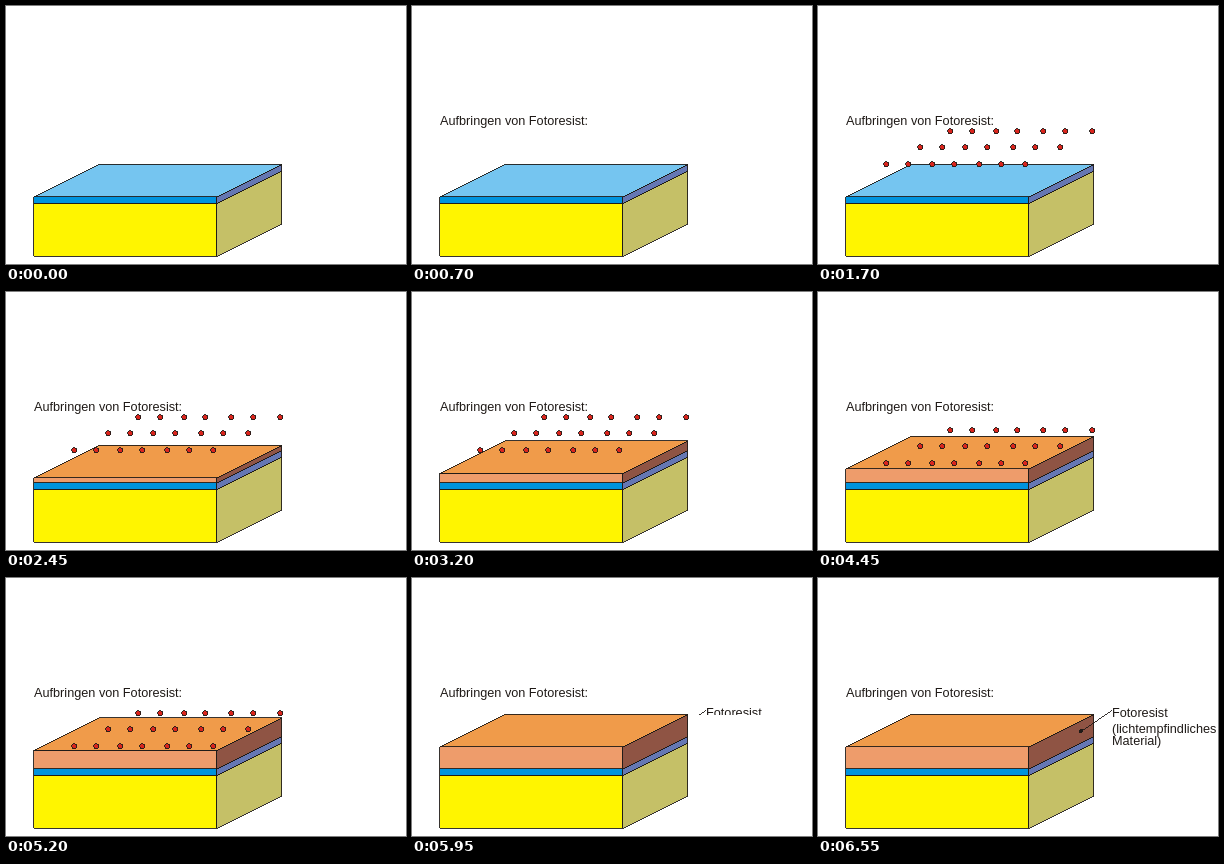
Write an HTML page that moves like this. It is 400 px wide and 258 px high and loops after 8550 ms.

```html
<!DOCTYPE html>
<html lang="de">
<head>
<meta charset="utf-8">
<title>Aufbringen von Fotoresist</title>
<style>
  html, body { margin: 0; width: 100%; height: 100%; overflow: hidden; background: #fff; }
  svg { display: block; }
  text { font: 12.7px "Liberation Sans", Arial, sans-serif; fill: #1f1a17; }
  /* Just under one pixel, so that crisp diagonals stay one pixel thick */
  .drawing { stroke: #1f1a17; stroke-width: .89; shape-rendering: crispEdges; }
</style>
</head>
<body>
<svg id="stage" width="400" height="258" viewBox="0 0 400 258"></svg>
<script>
const LOOP = 8550;
const LEFT = 27.5, RIGHT = 210.5, DEPTH_X = 65, DEPTH_Y = -32.5;
const SURFACE = 190.7, OXIDE_BOTTOM = 197.3, BASE_BOTTOM = 250.3;

// Front edge of the resist after each deposition cycle
const RESIST_TOPS = [SURFACE, 185.7, 181.3, 176.7, 172.3, 168.7];
// Drop of the particles in the three poses of each cycle
const DROPS = [[0, 15.5, 27], [0, 12, 21], [0, 12, 19], [0, 8, 13], [0, 5, 10]];
const ROWS = [
  { y: 125.2, xs: [132, 154, 178, 199, 225, 247, 274] },
  { y: 141.2, xs: [102, 124, 147, 169, 195, 217, 242] },
  { y: 158.2, xs: [68, 90, 114, 136, 161, 183, 207] }
];
const RAIN_START = 1700, POSE = 250, CYCLE = 3 * POSE;
const RAIN_END = RAIN_START + DROPS.length * CYCLE;

const polygon = (points, fill) => `<polygon points="${points.join(" ")}" fill="${fill}"/>`;
const text = (x, y, words) => `<text x="${x}" y="${y}">${words}</text>`;

function slab(top, bottom, front, side) {
  const back = RIGHT + DEPTH_X;
  return polygon([LEFT, top, RIGHT, top, RIGHT, bottom, LEFT, bottom], front) +
    polygon([RIGHT, top, back, top + DEPTH_Y, back, bottom + DEPTH_Y, RIGHT, bottom], side);
}

function lid(y, fill) {
  return polygon([LEFT, y, RIGHT, y, RIGHT + DEPTH_X, y + DEPTH_Y, LEFT + DEPTH_X, y + DEPTH_Y], fill);
}

function particles(drop) {
  return ROWS.map(({ y, xs }) => xs.map(x =>
    `<circle cx="${x + 0.2}" cy="${y + drop}" r="2.6" fill="#da251d"/>`).join("")).join("");
}

// Shows content from the top of the stage down to the given height
function wipe(id, bottom, content) {
  return `<clipPath id="${id}"><rect width="400" height="${bottom}"/></clipPath>
    <g clip-path="url(#${id})">${content}</g>`;
}

const stepsSince = (t, start, count) => Math.min(count, Math.floor((t - start) / 100) + 1);

function headline(t) {
  if (t < 500) return "";
  const bottom = Math.round(109 + 13 * stepsSince(t, 500, 3) / 3);
  return wipe("headline", bottom, text(28, 119, "Aufbringen von Fotoresist:"));
}

function label(t) {
  if (t < 5700) return "";
  const steps = t < 5950 ? 0 : stepsSince(t, 5950, 7);
  const bottom = Math.round(132 + 38 * steps / 7);
  return wipe("label", bottom,
    `<g class="drawing"><path d="M263 153.5L294 132.5"/>
      <circle cx="263" cy="153" r="2" fill="#1f1a17" stroke="none"/></g>` +
    text(294, 139, "Fotoresist") +
    text(294, 155, "(lichtempfindliches") +
    text(294, 167, "Material)"));
}

function scene(t) {
  const raining = t >= RAIN_START && t < RAIN_END;
  const elapsed = Math.max(0, t - RAIN_START);
  const level = Math.min(DROPS.length, Math.floor(elapsed / CYCLE));
  const pose = Math.floor(elapsed % CYCLE / POSE);
  const resistTop = RESIST_TOPS[level];

  let shapes = slab(OXIDE_BOTTOM, BASE_BOTTOM, "#fff500", "#c5c067") +
    slab(SURFACE, OXIDE_BOTTOM, "#0093dd", "#6577b3") +
    lid(SURFACE, "#75c5f0");
  if (level) shapes += slab(resistTop, SURFACE, "#ee9c6b", "#8f5444") + lid(resistTop, "#f09b4a");
  if (raining) shapes += particles(DROPS[level][pose]);

  return `<g class="drawing">${shapes}</g>` + headline(t) + label(t);
}

const stage = document.getElementById("stage");
const start = performance.now();
let shown = "";

function draw() {
  const next = scene((performance.now() - start) % LOOP);
  if (next !== shown) stage.innerHTML = shown = next;
  requestAnimationFrame(draw);
}
draw();
</script>
</body>
</html>
```
